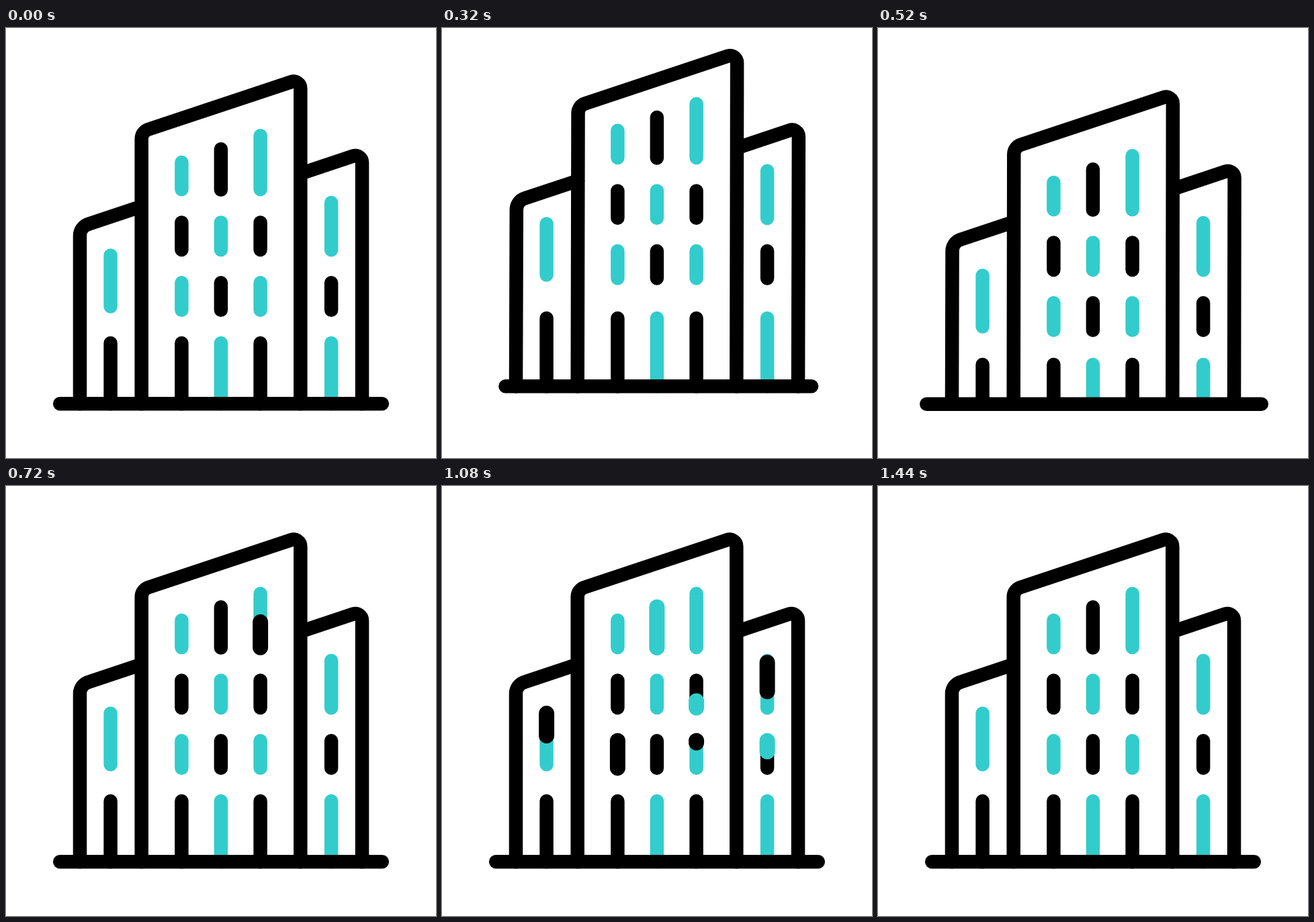
Animation, 640 px wide and 640 px high, one loop 1480 ms. Source, as an HTML page with a canvas:

```html
<!DOCTYPE html>
<html lang="en">
<head>
<meta charset="utf-8">
<title>City buildings</title>
<style>
  html, body { margin: 0; width: 100%; height: 100%; overflow: hidden; background: #fff; }
  canvas { display: block; width: 100vw; height: 100vh; }
</style>
</head>
<body>
<canvas id="stage" width="640" height="640"></canvas>
<script>
const ctx = document.getElementById('stage').getContext('2d');
const LOOP = 1480, STEP = 40;
const BLACK = '#000', TEAL = '#33cccc';
const LINE = 20.5, GLOW_LINE = 23;
const COLS = [155.6, 261.4, 319.9, 378.6, 484.1];

// Upper windows: column, top, bottom, colour, and the start time of the colour flip.
// "from" is the end the flip grows out of; "inset" shortens its top.
const WINDOWS = [
  { col: 0, top: 338.6, bottom: 414.6, color: TEAL, flip: 1007, from: 'top' },
  { col: 1, top: 200, bottom: 240.3, color: TEAL },
  { col: 2, top: 180.2, bottom: 240.7, color: BLACK, flip: 900, from: 'bottom' },
  { col: 3, top: 160.3, bottom: 240.3, color: TEAL, flip: 643, from: 'bottom' },
  { col: 1, top: 289.6, bottom: 330, color: BLACK },
  { col: 2, top: 289.6, bottom: 330, color: TEAL },
  { col: 3, top: 289.6, bottom: 330, color: BLACK, flip: 1028, from: 'bottom' },
  { col: 1, top: 379.2, bottom: 419.7, color: TEAL, flip: 880, from: 'top' },
  { col: 2, top: 379.2, bottom: 419.7, color: BLACK },
  { col: 3, top: 379.2, bottom: 419.7, color: TEAL, flip: 1054, from: 'top' },
  { col: 4, top: 260, bottom: 330.2, color: TEAL, flip: 985, from: 'top', inset: 2.7 },
  { col: 4, top: 379.2, bottom: 419.7, color: BLACK, flip: 1011, from: 'top' }
];
const DOORS = [BLACK, BLACK, TEAL, BLACK, TEAL];

const smooth = u => {
  u = Math.min(1, Math.max(0, u));
  return u * u * (3 - 2 * u);
};

// Rest, jump, squat, rest.
function hop(t, jump, squat) {
  const times = [80, 280, 480, 640], values = [0, jump, squat, 0];
  let v = 0;
  for (let i = 1; i < times.length; i++) {
    v += (values[i] - values[i - 1]) * smooth((t - times[i - 1]) / (times[i] - times[i - 1]));
  }
  return v;
}

// Grow, hold, withdraw.
const flipAmount = age => smooth(age / 160) - smooth((age - 220) / 160);

function bar(x1, y1, x2, y2, color, width = LINE) {
  ctx.strokeStyle = color;
  ctx.lineWidth = width;
  ctx.beginPath();
  ctx.moveTo(x1, y1);
  ctx.lineTo(x2, y2);
  ctx.stroke();
}

function drawWindow(w, t, dy) {
  const x = COLS[w.col], top = w.top + dy, bottom = w.bottom + dy;
  bar(x, top, x, bottom, w.color);
  const amount = w.flip ? flipAmount(t - w.flip) : 0;
  if (amount < 0.002) return;
  const color = w.color === TEAL ? BLACK : TEAL;
  const start = top + (w.inset || 0), span = (bottom - start) * amount;
  if (w.from === 'top') bar(x, start, x, start + span, color, GLOW_LINE);
  else bar(x, bottom, x, bottom - span, color, GLOW_LINE);
}

function drawOutlines(dx, dy, ground) {
  ctx.strokeStyle = BLACK;
  ctx.lineWidth = LINE;
  ctx.beginPath();
  // left block
  ctx.moveTo(110, ground);
  ctx.arcTo(110 + dx, 296 + dy, 201.7 + dx, 265.5 + dy, 18);
  ctx.lineTo(201.7 + dx, 265.5 + dy);
  // tower
  ctx.moveTo(201.7, ground);
  ctx.arcTo(201.7 + dx, 154.3 + dy, 438.3 + dx, 75.6 + dy, 15);
  ctx.arcTo(438.3 + dx, 75.6 + dy, 438.3, ground, 10.5);
  ctx.lineTo(438.3, ground);
  // right block
  ctx.moveTo(438.3 + dx, 216.8 + dy);
  ctx.arcTo(530 + dx, 186.2 + dy, 530, ground, 10);
  ctx.lineTo(530, ground);
  ctx.stroke();
}

function draw(t) {
  const ground = 559.2 + hop(t, -29, 0.6);
  const windowShift = hop(t, -56.8, 35.5);
  const doorTop = 468.9 + hop(t, -45.5, 38);

  ctx.fillStyle = '#fff';
  ctx.fillRect(0, 0, 640, 640);
  ctx.lineCap = 'round';
  ctx.lineJoin = 'round';

  DOORS.forEach((color, i) => bar(COLS[i], doorTop, COLS[i], ground, color));
  drawOutlines(hop(t, 0.9, 0.7), hop(t, -46, 27.2), ground);
  WINDOWS.forEach(w => drawWindow(w, t, windowShift));
  bar(80.2 + hop(t, 17, -9.3), ground, 559.8 + hop(t, -12.4, 13), ground, BLACK);
}

const origin = performance.now();
function tick() {
  const t = (performance.now() - origin) % LOOP;
  draw(Math.floor(t / STEP) * STEP);
  requestAnimationFrame(tick);
}
tick();
</script>
</body>
</html>
```
